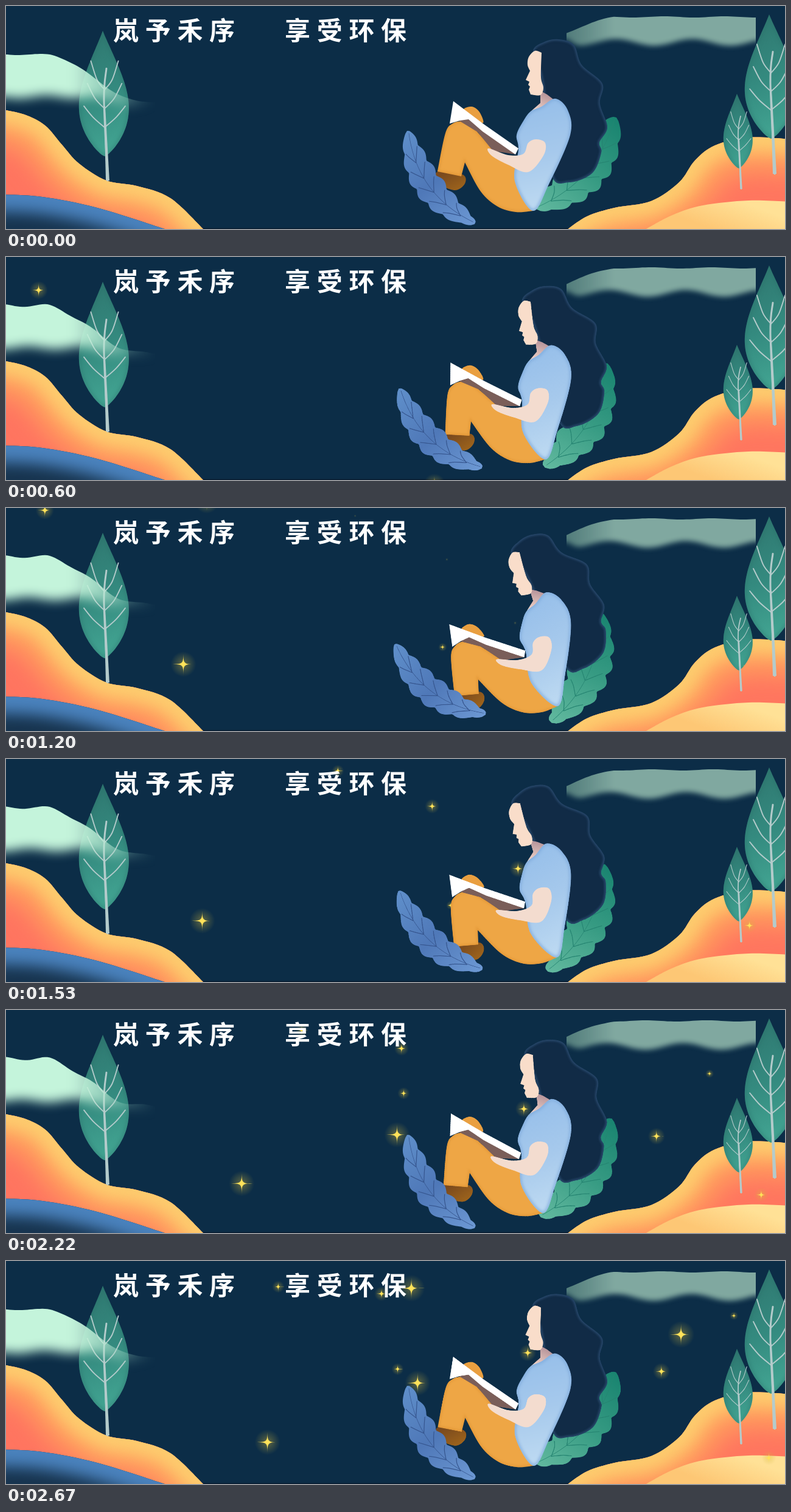
Write an HTML page with a canvas that moves like this. It is 1280 px wide and 368 px high and loops after 2.7 s.

```html
<!DOCTYPE html>
<html lang="zh">
<head>
<meta charset="utf-8">
<style>
  html, body { margin: 0; width: 100%; height: 100%; overflow: hidden; background: #0c2d47; }
  canvas { display: block; width: 100vw; height: 100vh; }
</style>
</head>
<body>
<canvas id="stage" width="1280" height="368"></canvas>
<script>
const W = 1280, H = 368, LOOP = 2700, STEP = 30, PI = Math.PI;
const ctx = document.getElementById('stage').getContext('2d');

const ease = (x, a, b) => {
  const u = Math.max(0, Math.min(1, (x - a) / (b - a)));
  return u * u * (3 - 2 * u);
};
// Linear rise to 1 at peak, linear fall to 0 at end
const swing = (t, peak, end) => t < peak ? t / peak : Math.max(0, (end - t) / (end - peak));
const sample = (n, f) => Array.from({ length: n + 1 }, (_, i) => f(i / n));

// Catmull-Rom curve through a flat list of x, y
function addCurve(p, pts, closed) {
  const n = pts.length / 2;
  const at = i => {
    i = closed ? (i + n) % n : Math.max(0, Math.min(n - 1, i));
    return [pts[2 * i], pts[2 * i + 1]];
  };
  for (let i = 0; i < (closed ? n : n - 1); i++) {
    const [a, b, c, d] = [at(i - 1), at(i), at(i + 1), at(i + 2)];
    p.bezierCurveTo(b[0] + (c[0] - a[0]) / 6, b[1] + (c[1] - a[1]) / 6,
      c[0] - (d[0] - b[0]) / 6, c[1] - (d[1] - b[1]) / 6, c[0], c[1]);
  }
}
function curve(pts, closed = true) {
  const p = new Path2D();
  p.moveTo(pts[0], pts[1]);
  addCurve(p, pts, closed);
  if (closed) p.closePath();
  return p;
}
function poly(points) {
  const p = new Path2D();
  points.forEach(q => p.lineTo(...q));
  p.closePath();
  return p;
}
// Closed shape with a half width on both sides of a middle line along x
const spindle = (len, mid, half, n = 90) => poly([
  ...sample(n, s => [len * s, mid(s) - half(s)]),
  ...sample(n, s => [len * (1 - s), mid(1 - s) + half(1 - s)])
]);
function grad(g, x0, y0, x1, y1, ...stops) {
  const f = g.createLinearGradient(x0, y0, x1, y1);
  stops.forEach((c, i) => f.addColorStop(i / (stops.length - 1), c));
  return f;
}
function fill(g, path, style) { g.fillStyle = style; g.fill(path); }
function line(g, path, style, width) {
  g.strokeStyle = style;
  g.lineWidth = width;
  g.lineCap = 'round';
  g.stroke(path);
}
// Soft band along an edge, kept inside the shape
function innerEdge(g, shape, edge, color, width, blur) {
  g.save();
  g.clip(shape);
  g.filter = `blur(${blur}px)`;
  line(g, edge, color, width);
  g.restore();
}
function layer(draw, scale) {
  const c = document.createElement('canvas');
  c.width = W * scale;
  c.height = H * scale;
  const g = c.getContext('2d');
  g.scale(scale, scale);
  draw(g);
  return c;
}

function tree(g, x, top, bottom, half, foot, lean) {
  const h = bottom - top;
  g.save();
  g.translate(x, top);
  g.rotate(PI / 2);
  const crown = spindle(h, s => 3 * (1 - s), s => half * Math.max(0, Math.sin(PI * s ** 1.4)) ** 0.75);
  fill(g, crown, grad(g, 0, half, h, -half, '#2f766f', '#348a7f', '#45aa96'));
  innerEdge(g, crown, crown, 'rgba(42,112,106,.5)', 5, 3);
  g.restore();

  const bark = '#b4cbcb', y = k => top + h * k, thick = half / 7;
  line(g, curve([x + 3, y(0.3), x - 1, y(0.55), x + lean, foot], false), bark, thick * 0.5);
  fill(g, poly([[x - 1, y(0.6)], [x + 1, y(0.6)], [x + lean + thick / 2, foot], [x + lean - thick / 2, foot]]), bark);
  for (let i = 0; i < 3; i++) for (const side of [-1, 1]) {
    const k = 0.47 + i * 0.15, reach = half * (0.55 + i * 0.14) * side;
    line(g, curve([x, y(k), x + reach * 0.55, y(k - 0.08), x + reach, y(k - 0.23 + i * 0.03)], false), bark, thick * 0.32);
  }
}

function hill(g, edge, base, bands) {
  const top = curve(edge, false), shape = new Path2D(top);
  shape.lineTo(edge[0] < 0 ? -10 : W + 10, H + 1);
  shape.closePath();
  fill(g, shape, base);
  bands.forEach(b => innerEdge(g, shape, top, ...b));
}

function scenery(g) {
  g.fillStyle = '#0c2d47';
  g.fillRect(0, 0, W, H);
  g.fillStyle = '#081c30';
  g.fillRect(0, 366.5, W, 2);

  const warm = [['#ffa25e', 110, 20], ['#fdcc6e', 46, 13]];
  hill(g, [-10, 170, 30, 179, 64, 197, 92, 229, 120, 260, 165, 288, 215, 297, 270, 317, 325, 369], '#ff7560', warm);
  hill(g, [-10, 311, 60, 315, 150, 333, 264, 369], '#17344f', [['#4a82bd', 56, 12]]);
  hill(g, [922, 369, 955, 347, 1000, 333, 1060, 322, 1106, 291, 1132, 255, 1165, 230, 1220, 217, 1290, 220], '#ff765f', warm);
  hill(g, [1050, 369, 1095, 345, 1145, 329, 1220, 321, 1290, 323], grad(g, 1200, 320, 1180, 375, '#ffe196', '#fdc775'), []);

  tree(g, 162, 41, 248, 41, 288, 5);
  tree(g, 1257, 14, 219, 42, 277, 6);
  tree(g, 1204, 145, 268, 24, 302, 4);
}

// Lobed leaf from tip to stem, bent sideways by bow
function leaf(g, x0, y0, x1, y1, bow, width, ink, ...colors) {
  const len = Math.hypot(x1 - x0, y1 - y0);
  const mid = s => bow * 4 * s * (1 - s);
  const half = s => width * Math.max(0, Math.sin(PI * s)) ** 0.5 * (0.8 + 0.25 * Math.abs(Math.sin(6.5 * PI * s)));
  g.save();
  g.translate(x0, y0);
  g.rotate(Math.atan2(y1 - y0, x1 - x0));
  fill(g, spindle(len, mid, half), grad(g, 0, 0, len, 0, ...colors));
  line(g, poly([...sample(20, s => [len * s * 0.95 + 5, mid(s)]), ...sample(20, s => [len * (1 - s) * 0.95 + 5, mid(1 - s)])]), ink, 0.7);
  for (let s = 0.2; s < 0.9; s += 0.15) for (const side of [-1, 1]) {
    const tip = s - 0.04;
    line(g, curve([len * (s + 0.07), mid(s + 0.07), len * s, mid(s) + side * half(s) * 0.4,
      len * tip, mid(tip) + side * half(tip) * 0.8], false), ink, 1.2);
  }
  g.restore();
}
const greenLeaf = g => leaf(g, 1003, 184, 871, 335, -22, 33, '#268572', '#198470', '#379b83', '#62b99f');
const blueLeaf = g => leaf(g, 659, 206, 770, 360, 24, 24, '#36568f', '#5f8fca', '#4f78b8', '#6d99d4');

function reader(g) {
  const hair = curve([866, 74, 885, 59, 908, 55, 933, 64, 946, 97, 980, 128, 976, 161, 988, 200,
    975, 225, 978, 242, 963, 276, 925, 291, 896, 277, 884, 150, 878, 110]);
  fill(g, hair, '#112b46');
  innerEdge(g, hair, hair, '#27476a', 5, 3);

  fill(g, poly([[878, 140], [889, 146], [902, 156], [885, 168], [861, 175], [878, 160]]),
    grad(g, 885, 145, 872, 174, '#b9979c', '#f0d3c7'));
  const face = curve([880, 77, 869, 74, 859, 84, 857, 97, 861, 107], false);
  [[854, 122], [860, 125], [858, 130], [861, 133], [859, 138], [862, 146]].forEach(q => face.lineTo(...q));
  addCurve(face, [862, 146, 878, 147, 883, 135, 879, 117, 880, 77]);
  fill(g, face, '#f9ddca');

  fill(g, curve([752, 173, 765, 166, 778, 175, 783, 193]), '#e99f40');
  fill(g, curve([710, 273, 750, 278, 754, 293, 737, 304, 708, 291]), grad(g, 720, 275, 735, 304, '#7a4a1e', '#9a611c'));

  const legs = curve([709, 273, 722, 210, 734, 194, 750, 191, 766, 199, 806, 243, 838, 264, 866, 338], false);
  addCurve(legs, [866, 338, 838, 340, 808, 331, 780, 306, 754, 258]);
  legs.lineTo(748, 281);
  legs.closePath();
  fill(g, legs, '#eea645');
  innerEdge(g, legs, legs, 'rgba(224,147,50,.6)', 5, 3);

  const shirt = curve([862, 174, 880, 166, 903, 153, 923, 172, 927, 213, 892, 294, 866, 338,
    836, 289, 842, 237, 839, 213, 850, 190]);
  fill(g, shirt, grad(g, 855, 170, 890, 320, '#98c0ea', '#a6c9ec', '#bbd8f1'));
  innerEdge(g, shirt, shirt, 'rgba(126,170,220,.7)', 6, 4);

  fill(g, poly([[744, 189], [760, 186], [783, 205], [838, 245], [800, 239], [775, 208]]), '#7a5e59');
  fill(g, poly([[735, 157], [785, 195], [842, 235], [837, 245], [783, 207], [760, 187], [746, 189], [729, 194]]), '#fff');

  fill(g, curve([858, 226, 871, 220, 886, 226, 883, 247, 858, 274, 825, 262, 798, 247, 793, 235, 825, 246, 850, 244]), '#f3dccf');
}

// Birth time: [x, y, speed x, speed y in px/s, radius]
const waves = {
  150: [[46, 93, 17, -85, 15], [704, 353, 0, 50, 18]],
  600: [[348, 25, -30, -60, 20], [235, 241, 94, 28, 21], [694, 208, 39, 36, 7]],
  1150: [[578, 12, -86, 20, 10], [728, 86, -73, -21, 12], [836, 191, 14, -26, 14], [1211, 258, 28, 44, 12]],
  1600: [[667, 81, -22, 91, 10], [596, 212, 75, -10, 21]],
  1950: [[1064, 224, 18, -58, 14], [1132, 114, 89, -33, 7]],
  2300: [[655, 56, 30, -30, 22], [1098, 136, 30, -40, 22]]
};
function star(age, x, y, vx, vy, r) {
  const show = Math.min(1, age / 200);
  ctx.save();
  ctx.translate(x + vx * age / 1000, y + vy * age / 1000);
  ctx.scale(r * show, r * show);
  ctx.globalAlpha = show;
  const glow = ctx.createRadialGradient(0, 0, 0, 0, 0, 1);
  glow.addColorStop(0, 'rgba(255,224,70,.7)');
  glow.addColorStop(0.25, 'rgba(220,190,60,.3)');
  glow.addColorStop(1, 'rgba(200,180,60,0)');
  ctx.fillStyle = glow;
  ctx.fillRect(-1, -1, 2, 2);
  ctx.fillStyle = '#ffe25a';
  ctx.beginPath();
  ctx.moveTo(0, -1);
  for (const [px, py] of [[1, 0], [0, 1], [-1, 0], [0, -1]]) ctx.bezierCurveTo(0, -0.02, 0, 0.02, px, py);
  ctx.arc(0, 0, 0.13, 0, 2 * PI);
  ctx.fill();
  ctx.restore();
}

// Crisp upper edge, blurred wavy lower edge
function cloud(x0, x1, top, low, style, blur) {
  const xs = sample(60, s => x0 + (x1 - x0) * s);
  const upper = xs.map(x => [x, top(x)]);
  ctx.save();
  ctx.clip(poly([...upper, [x1, 200], [x0, 200]]));
  ctx.filter = `blur(${blur}px)`;
  fill(ctx, poly([[x0 - 20, -20], [x1 + 20, -20], [x1 + 20, low(x1)], ...xs.reverse().map(x => [x, low(x)]), [x0 - 20, low(x0)]]), style);
  ctx.restore();
}
function leftCloud(k) {
  cloud(-2, 245,
    x => 80 + 78 * ease(x + 6 * k, 65, 225) + (1 + 2 * k) * Math.cos((x - 20 - 25 * k) / 12 + k),
    x => 150 + 14 * ease(x, 120, 220) + 2.5 * Math.sin(x / 14 + PI * k),
    grad(ctx, 110, 0, 245, 0, '#c4f4db', 'rgba(190,238,214,.75)', 'rgba(150,205,190,.35)', 'rgba(110,160,155,0)'), 9);
}
function rightCloud(k) {
  cloud(921, 1232,
    x => 18 + 26 * (1 - Math.min(1, (x - 921) / 80)) ** 1.3 + Math.sin(x / 16 + 2 * k),
    x => 60 + 5.5 * Math.cos((x - 1065) / 125 * 2 * PI + 0.8 * k) - 10 * (1 - ease(x, 915, 945)),
    grad(ctx, 920, 0, 1000, 0, 'rgba(105,150,140,.75)', 'rgba(134,174,164,.96)'), 4);
}

function turned(img, x, y, deg) {
  ctx.save();
  ctx.translate(x, y);
  ctx.rotate(-deg * PI / 180);
  ctx.drawImage(img, -x, -y, W, H);
  ctx.restore();
}

function title() {
  ctx.font = '900 42px "Noto Sans CJK SC", "Noto Sans CJK", sans-serif';
  ctx.textAlign = 'center';
  ctx.fillStyle = '#fff';
  [['岚予禾序', 197], ['享受环保', 479]].forEach(([s, x]) =>
    [...s].forEach((c, i) => ctx.fillText(c, x + i * 52.7, 56)));
}

const back = layer(scenery, 1), green = layer(greenLeaf, 2), blue = layer(blueLeaf, 2), woman = layer(reader, 2);

function draw(t) {
  ctx.drawImage(back, 0, 0);
  for (const birth in waves) if (t > birth) waves[birth].forEach(s => star(t - birth, ...s));
  const puff = swing(t % 900, 450, 900);
  leftCloud(puff);
  rightCloud(puff);
  turned(green, 949, 260, 18.5 * swing(t, 1080, LOOP));
  turned(woman, 849, 197, 19 * swing(t, 1350, LOOP));
  turned(blue, 714, 288, 18.5 * swing(t, 1080, 2160));
  title();
}

let began;
function tick(now) {
  began ??= now;
  draw(Math.floor((now - began) % LOOP / STEP) * STEP);
  requestAnimationFrame(tick);
}
requestAnimationFrame(tick);
</script>
</body>
</html>
```
